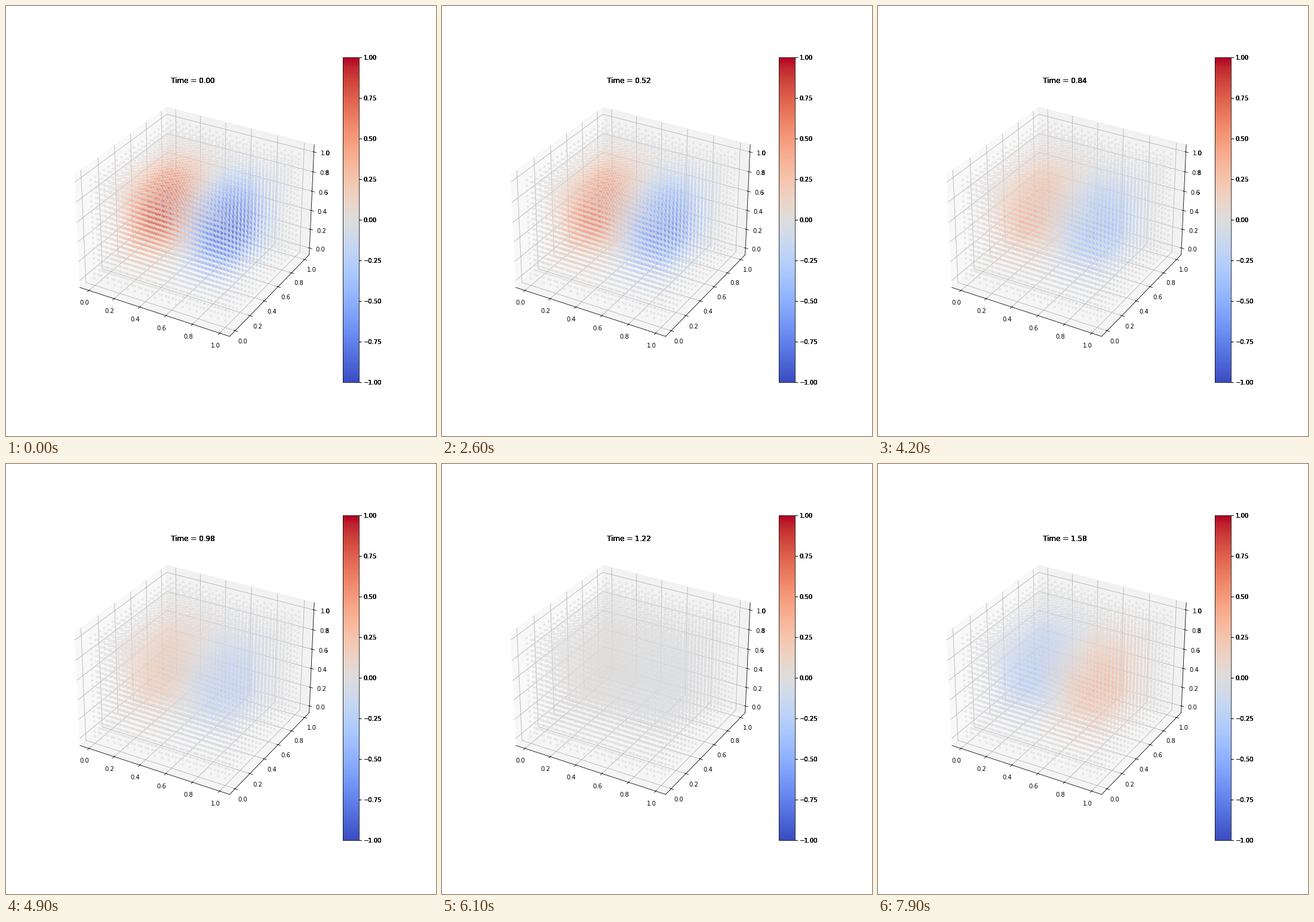
Animation, 720 px wide and 720 px high, one loop 8000 ms. Source, as a matplotlib script:

```python
import numpy as np
import matplotlib.pyplot as plt
from matplotlib.animation import FuncAnimation
from matplotlib.artist import Artist
from matplotlib.transforms import Bbox

FRAMES, INTERVAL, DT = 80, 100, 0.02
N = 20
OMEGA = 2 * np.pi / 5
PASSES = 5

plt.rcParams.update({
    "font.family": "DejaVu Sans",
    "font.size": 10,
    "figure.subplot.bottom": 0.125,
})

axis = np.linspace(0, 1, N)
X, Y, Z = (g.ravel() for g in np.meshgrid(axis, axis, axis, indexing="ij"))
MODE = np.sin(2 * np.pi * X) * np.sin(np.pi * Y) * np.sin(np.pi * Z)

fig = plt.figure(figsize=(10, 10), dpi=72, facecolor="white")
ax = fig.add_subplot(111, projection="3d", facecolor="none")
dots = ax.scatter(X, Y, Z, c=MODE, cmap="coolwarm", vmin=-1, vmax=1,
                  s=10, alpha=0.5)
# opaque proxy keeps the colour bar free of the dots' transparency
shades = plt.cm.ScalarMappable(norm=dots.norm, cmap="coolwarm")
bar = fig.colorbar(shades, ax=ax)
title = ax.set_title("")


class Overprint(Artist):
    """Draws the lettering outside the cube's axes again, hardening its edges."""

    def draw(self, renderer):
        right = ax.get_position().x1 * fig.bbox.width
        outside = Bbox([[right, 0], [fig.bbox.width, fig.bbox.height]])
        labels = [t.label1 for t in ax.zaxis.majorTicks
                  if -0.01 < t.get_loc() < 1.01]
        for label in labels:
            label.set_clip_box(outside)
            label.set_clip_on(True)
        for _ in range(PASSES):
            title.draw(renderer)
            bar.ax.yaxis.draw(renderer)
            for label in labels:
                label.draw(renderer)
        for label in labels:
            label.set_clip_on(False)
            label.set_clip_box(None)


fig.add_artist(Overprint()).set_zorder(10)


def update(i):
    t = i * DT
    dots.set_array(MODE * np.cos(OMEGA * t))
    title.set_text(f"Time = {t:.2f}")
    return dots, title


anim = FuncAnimation(fig, update, frames=FRAMES, interval=INTERVAL,
                     repeat=True, repeat_delay=0, blit=False)
plt.show()
```
